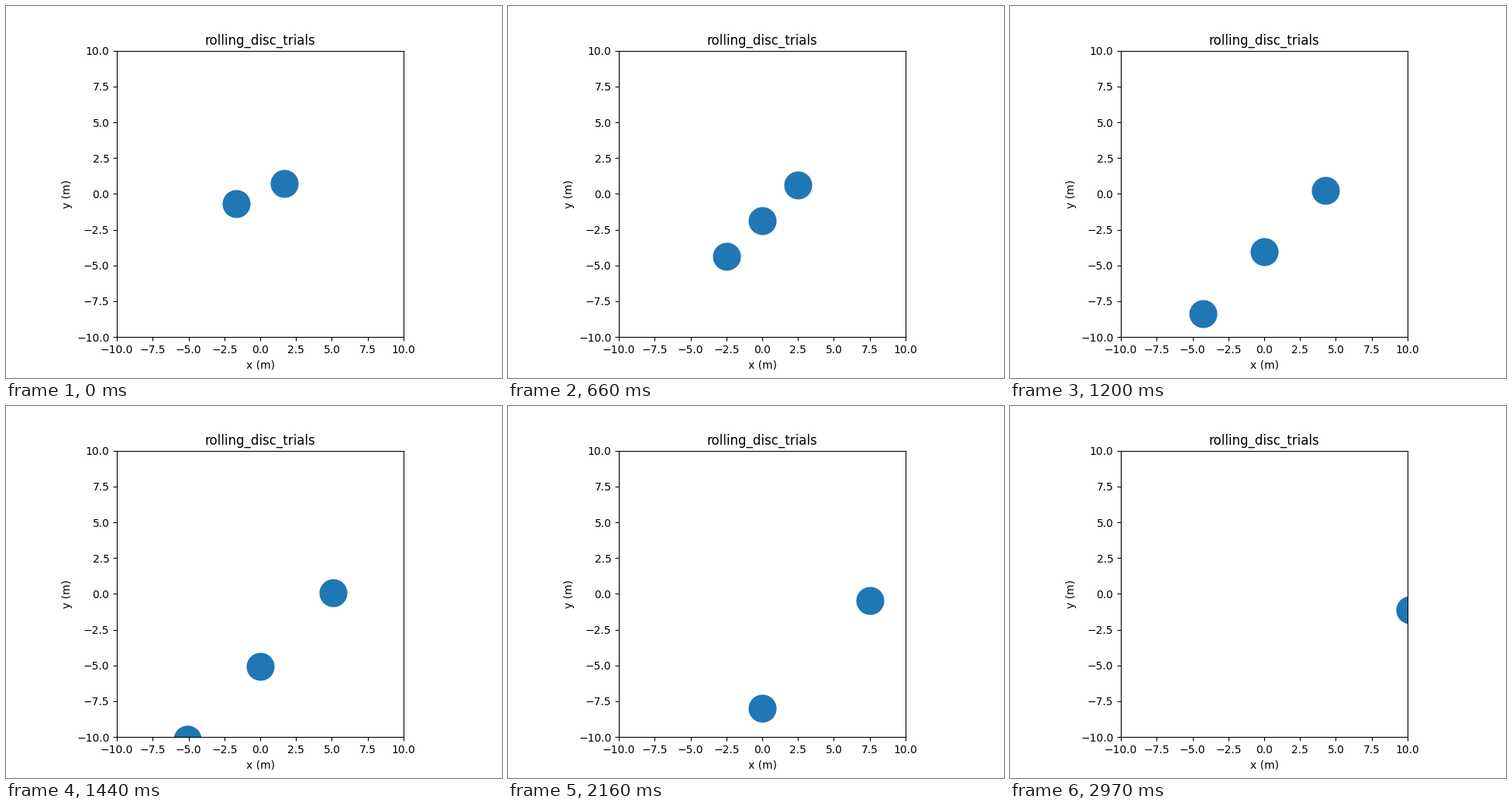
Write a matplotlib script that moves like this. It is 640x480 px and loops after 3000 ms.

```python
import matplotlib.pyplot as plt
from matplotlib.animation import FuncAnimation
import numpy as np

FRAMES = 100
INTERVAL = 30
HIT = 7                              # frame at which the discs bounce
SPEED = 0.1                          # horizontal units per frame
SLOPE = np.tan(np.pi / 8)            # incoming direction
DRIFT = 0.1225                       # common fall after the bounce
START = np.array([1.7, 1.7 * SLOPE])


def positions(n):
    """Return the disc centres at frame n."""
    if n < HIT:
        right = START + n * SPEED * np.array([-1, SLOPE])
        return np.array([right, -right])
    spread = np.array([1 + SPEED * (n - HIT), 0.995 + SPEED * (n - HIT)])
    middle = np.array([0, -DRIFT * (n - HIT + 0.15)])
    return np.array([middle + spread, middle - spread, middle])


fig, ax = plt.subplots(figsize=(6.4, 4.8), dpi=100)
ax.set_aspect("equal")
ax.set_xlim(-10, 10)
ax.set_ylim(-10, 10)
ax.set_xlabel("x (m)")
ax.set_ylabel("y (m)")
ax.set_title("rolling_disc_trials")
discs, = ax.plot([], [], "o", color="tab:blue", markersize=25)


def update(n):
    discs.set_data(*positions(n).T)
    return discs,


anim = FuncAnimation(fig, update, frames=FRAMES, interval=INTERVAL,
                     repeat=True, repeat_delay=0)
plt.show()
```
